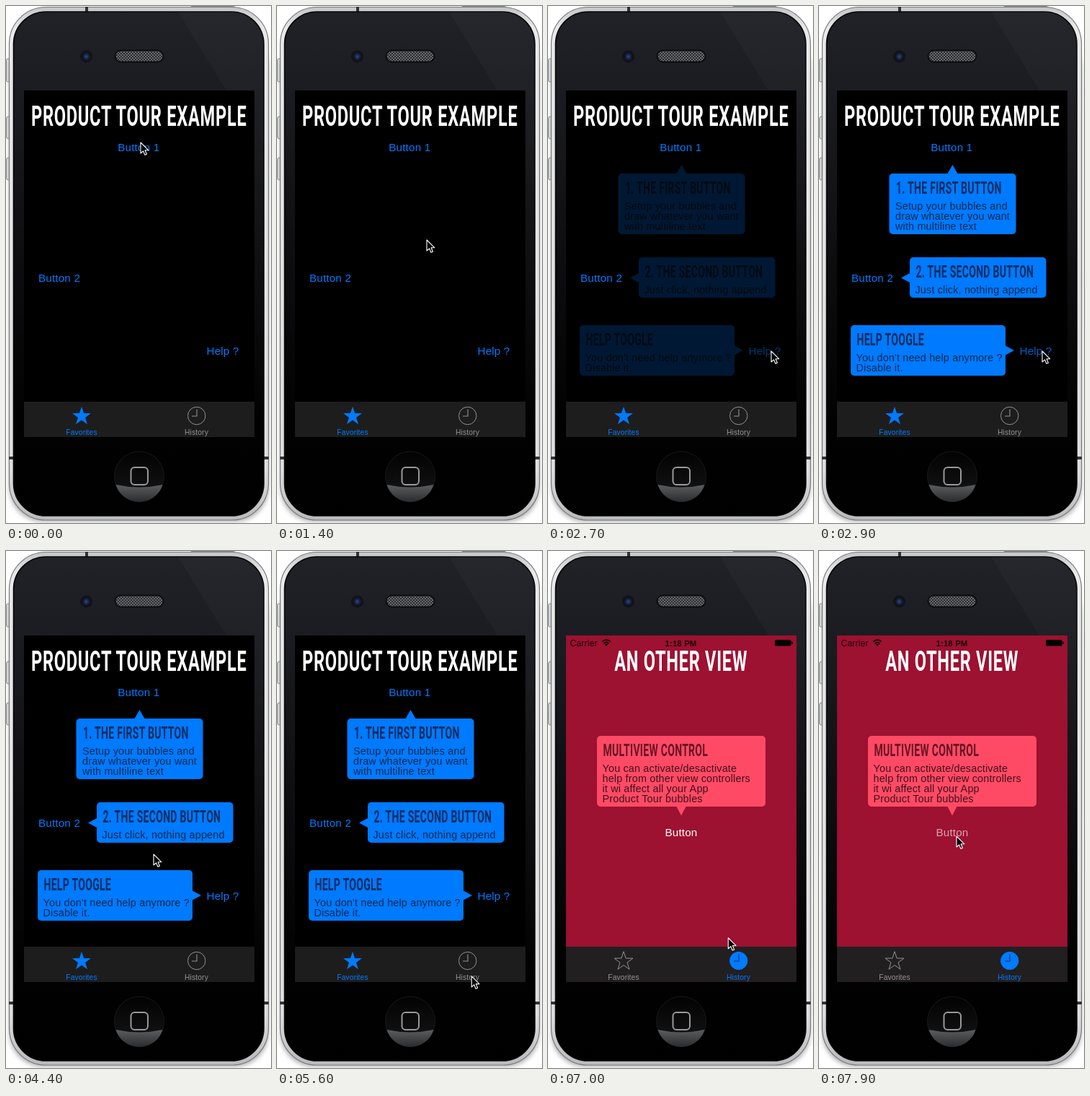
Animation, 368 px wide and 716 px high, one loop 8000 ms. Source, as an HTML page:

```html
<!DOCTYPE html>
<html lang="en">
<head>
<meta charset="utf-8">
<title>Product tour</title>
<style>
  html, body { margin: 0; width: 100%; height: 100%; overflow: hidden; background: #fff; }
  svg { display: block; width: 100%; height: 100%; }
  text { font: 15.2px "Liberation Sans", Arial, sans-serif; letter-spacing: .012em; }
  .heading { font: 700 39.4px Roboto, sans-serif; letter-spacing: .03em; }
  .small { font-size: 23.4px; letter-spacing: .02em; }
  .body { font-size: 14.4px; }
  .tab { font-size: 10.3px; text-anchor: middle; }
  .status { font-size: 12.2px; }
  .clock { font-size: 11.4px; font-weight: 700; }
  .mid { text-anchor: middle; }
  .link { fill: #007aff; }
</style>
</head>
<body>
<svg viewBox="0 0 368 716">
  <defs>
    <linearGradient id="steel" x2="0" y2="1">
      <stop offset="0" stop-color="#c4c5c7"/>
      <stop offset=".04" stop-color="#e9e9ea"/>
      <stop offset=".9" stop-color="#dededf"/>
      <stop offset="1" stop-color="#b9babc"/>
    </linearGradient>
    <linearGradient id="face" x2="0" y2="1">
      <stop offset="0" stop-color="#212228"/>
      <stop offset=".16" stop-color="#1b1c21"/>
      <stop offset=".5" stop-color="#0d0d10"/>
      <stop offset=".8" stop-color="#020202"/>
      <stop offset="1" stop-color="#000"/>
    </linearGradient>
    <linearGradient id="gloss" x2="0" y2="1">
      <stop offset="0" stop-color="#fff" stop-opacity=".025"/>
      <stop offset="1" stop-color="#fff" stop-opacity="0"/>
    </linearGradient>
    <linearGradient id="home" x2="0" y2="1">
      <stop offset="0" stop-color="#020202"/>
      <stop offset=".6" stop-color="#0e0e0f"/>
      <stop offset="1" stop-color="#1c1c1e"/>
    </linearGradient>
    <linearGradient id="crescent" x2="0" y2="1">
      <stop offset="0" stop-color="#5c5d5f"/>
      <stop offset="1" stop-color="#2a2b2c"/>
    </linearGradient>
    <radialGradient id="lens">
      <stop offset="0" stop-color="#2d4a94"/>
      <stop offset=".5" stop-color="#1a2850"/>
      <stop offset="1" stop-color="#12141d"/>
    </radialGradient>
    <pattern id="mesh" width="4" height="4" patternUnits="userSpaceOnUse">
      <rect width="4" height="4" fill="#2c2d30"/>
      <path d="M0 0l4 4M4 0l-4 4" stroke="#77787b" stroke-width=".8"/>
    </pattern>
    <filter id="blur"><feGaussianBlur stdDeviation="3"/></filter>
    <clipPath id="faceClip"><rect x="10.5" y="8" width="347.5" height="698" rx="45"/></clipPath>
  </defs>

  <!-- phone body -->
  <g fill="#dedfe0" stroke="#8a8b8e">
    <rect x="256" y=".5" width="62" height="6" rx="2"/>
    <rect x=".5" y="73" width="7" height="32" rx="2"/>
    <rect x=".5" y="153" width="7" height="31" rx="3"/>
    <rect x=".5" y="210" width="7" height="31" rx="3"/>
  </g>
  <rect x="5" y="40" width="359" height="674" rx="46" fill="#777" opacity=".6" filter="url(#blur)"/>
  <rect x="4.5" y="1.5" width="360" height="710.5" rx="51" fill="url(#steel)" stroke="#77787b" stroke-width="1.2"/>
  <path d="M4 626h7M358 626h7M112 1v7" stroke="#333" stroke-width="4"/>
  <rect x="10.5" y="8" width="347.5" height="698" rx="45" fill="url(#face)" stroke="#050505" stroke-width="1.6"/>
  <path d="M239 8H358V600H345V117H306z" fill="url(#gloss)" clip-path="url(#faceClip)"/>
  <circle cx="111.5" cy="70" r="8.5" fill="#121318"/>
  <circle cx="111.5" cy="70" r="5.5" fill="url(#lens)"/>
  <rect x="151.5" y="61.5" width="67" height="16" rx="8" fill="url(#mesh)" stroke="#0c0c0e" stroke-width="2"/>
  <circle cx="185" cy="651.5" r="34.5" fill="url(#home)" stroke="#18191a"/>
  <path d="M152.5 663Q185 670 217.5 663A34 34 0 0 1 152.5 663z" fill="url(#crescent)"/>
  <rect x="173.5" y="639" width="23.5" height="24" rx="5" fill="none" stroke="#98999c" stroke-width="2"/>

  <rect id="screen" x="25" y="117" width="320" height="480"/>
  <g id="favorites"></g>
  <g id="history"></g>

  <!-- tab bar -->
  <rect id="bar" x="25" y="548" width="320" height="49"/>
  <path id="star"/>
  <text id="starLabel" class="tab" x="105" y="593.5">Favorites</text>
  <circle id="clock" cx="264.7" cy="567.5" r="12.2"/>
  <path id="hands" d="M265 558.5V568H258" fill="none" stroke-width="1.1"/>
  <text id="clockLabel" class="tab" x="264.5" y="593.5">History</text>

  <path id="cursor" d="M0 0V15L3.5 11.8L5.9 17.3L8.4 16.2L6.1 10.7H10.7z" stroke="#fff" stroke-width="1.1" stroke-linejoin="round"/>
</svg>
<script>
const $ = id => document.getElementById(id);
const LOOP = 8000, STEP = 100, SWITCH = 6000;
const BLUE = '#007aff', GRAY = '#929292';

const label = (x, y, text, attrs) => `<text x="${x}" y="${y}" ${attrs}>${text}</text>`;

// All headings share one condensed face.
const heading = (x, y, text, color, cls) =>
  `<text class="heading ${cls}" transform="translate(${x} ${y}) scale(.6 1)" fill="${color}">${text}</text>`;

function bubble({ box: [x, y, w, h], arrow, fill, ink, titleInk, title, lines, inset }) {
  const left = x + inset;
  return `<rect x="${x}" y="${y}" width="${w}" height="${h}" rx="5" fill="${fill}"/>
    <path d="${arrow}z" fill="${fill}"/>` +
    heading(left + .5, y + 28, title, titleInk, 'small') +
    lines.map((line, i) => label(left - .5, y + 50 + i * 14, line, `class="body" fill="${ink}"`)).join('');
}

const blue = { fill: BLUE, ink: '#08284f', titleInk: '#082d61' };
const red = { fill: '#ff4a65', ink: '#421119', titleInk: '#681523' };

$('favorites').innerHTML =
  heading(184.7, 166, 'PRODUCT TOUR EXAMPLE', '#fff', 'mid') +
  label(184.3, 200.5, 'Button 1', 'class="link mid"') +
  label(45, 381.5, 'Button 2', 'class="link"') +
  label(278.5, 482.5, 'Help ?', 'class="link" id="help"') +
  '<g id="bubbles">' +
  bubble({ ...blue, box: [97.5, 232, 176, 84], inset: 9, arrow: 'M178 233L185.5 220L193 233',
    title: '1. THE FIRST BUTTON',
    lines: ['Setup your bubbles and', 'draw whatever you want', 'with multiline text'] }) +
  bubble({ ...blue, box: [126, 348, 189.5, 56], inset: 8, arrow: 'M127 369.5L114 376.5L127 383.5',
    title: '2. THE SECOND BUTTON', lines: ['Just click, nothing append'] }) +
  bubble({ ...blue, box: [44, 442, 215, 70], inset: 8, arrow: 'M258 470L271 477L258 484',
    title: 'HELP TOOGLE', lines: ["You don't need help anymore ?", 'Disable it.'] }) +
  '</g>';

$('history').innerHTML =
  label(30.5, 131.5, 'Carrier', 'class="status" fill="#1a0308"') +
  label(184.5, 131.5, '1:18 PM', 'class="clock mid" fill="#1a0308"') +
  `<path d="M75.5 125.5Q81 120.5 86.5 125.5M77.5 128Q81 125 84.5 128" fill="none" stroke="#1a0308" stroke-width="1.7"/>
   <path d="M78.8 129.3Q81 127.6 83.2 129.3L81 131.7z"/>
   <rect x="315" y="123" width="22.5" height="8.5" rx="1.5"/><rect x="338.3" y="125.5" width="1.5" height="3.5"/>` +
  heading(184.7, 166, 'AN OTHER VIEW', '#fff', 'mid') +
  bubble({ ...red, box: [68, 256, 234, 98], inset: 8, arrow: 'M178 353L185 366.5L192 353',
    title: 'MULTIVIEW CONTROL',
    lines: ['You can activate/desactivate', 'help from other view controllers',
      'it wi affect all your App', 'Product Tour bubbles'] }) +
  label(185, 394.5, 'Button', 'class="mid" fill="#fff" id="button"');

$('star').setAttribute('d', 'M' + Array.from({ length: 10 }, (_, i) => {
  const r = i % 2 ? 5.3 : 13.6, a = i * Math.PI / 5;
  return `${105 + r * Math.sin(a)} ${568.3 - r * Math.cos(a)}`;
}).join('L') + 'z');

// Pointer stops: time, x, y
const path = [
  [0, 187, 189], [200, 187, 190], [1400, 208, 324], [1800, 255, 390], [2200, 310, 478],
  [3200, 310, 478], [4400, 205, 420], [4900, 254, 503], [5400, 268, 600], [5700, 271, 585],
  [6700, 271, 585], [7600, 191, 395], [LOOP, 191, 395]
];

const clamp = v => Math.max(0, Math.min(1, v));

function pointer(t) {
  const i = path.findIndex(stop => stop[0] > t);
  const [t0, x0, y0] = path[i - 1], [t1, x1, y1] = path[i];
  const p = (t - t0) / (t1 - t0), e = p * p * (3 - 2 * p);
  return [x0 + (x1 - x0) * e, y0 + (y1 - y0) * e];
}

function paint(id, fill, stroke) {
  $(id).setAttribute('fill', fill);
  $(id).setAttribute('stroke', stroke);
}

function draw(now) {
  const t = Math.floor(now % LOOP / STEP) * STEP;
  const second = t >= SWITCH;

  $('favorites').style.display = second ? 'none' : '';
  $('history').style.display = second ? '' : 'none';
  $('screen').setAttribute('fill', second ? '#9d1131' : '#000');
  $('bar').setAttribute('fill', second ? '#221f20' : '#1d1d1d');
  paint('star', second ? 'none' : BLUE, second ? GRAY : 'none');
  paint('clock', second ? BLUE : 'none', second ? BLUE : GRAY);
  paint('hands', 'none', second ? '#17345c' : GRAY);
  paint('starLabel', second ? GRAY : BLUE, 'none');
  paint('clockLabel', second ? BLUE : GRAY, 'none');

  $('bubbles').setAttribute('opacity', clamp((t - 2650) / 250));
  $('help').setAttribute('opacity', t < 2700 ? 1 : clamp(.45 + (t - 2700) / 600));
  $('button').setAttribute('opacity', t < 7700 ? 1 : .62);
  $('cursor').setAttribute('transform', `translate(${pointer(t)})`);
}

const start = performance.now();
(function frame() {
  draw(performance.now() - start);
  requestAnimationFrame(frame);
})();
</script>
</body>
</html>
```
